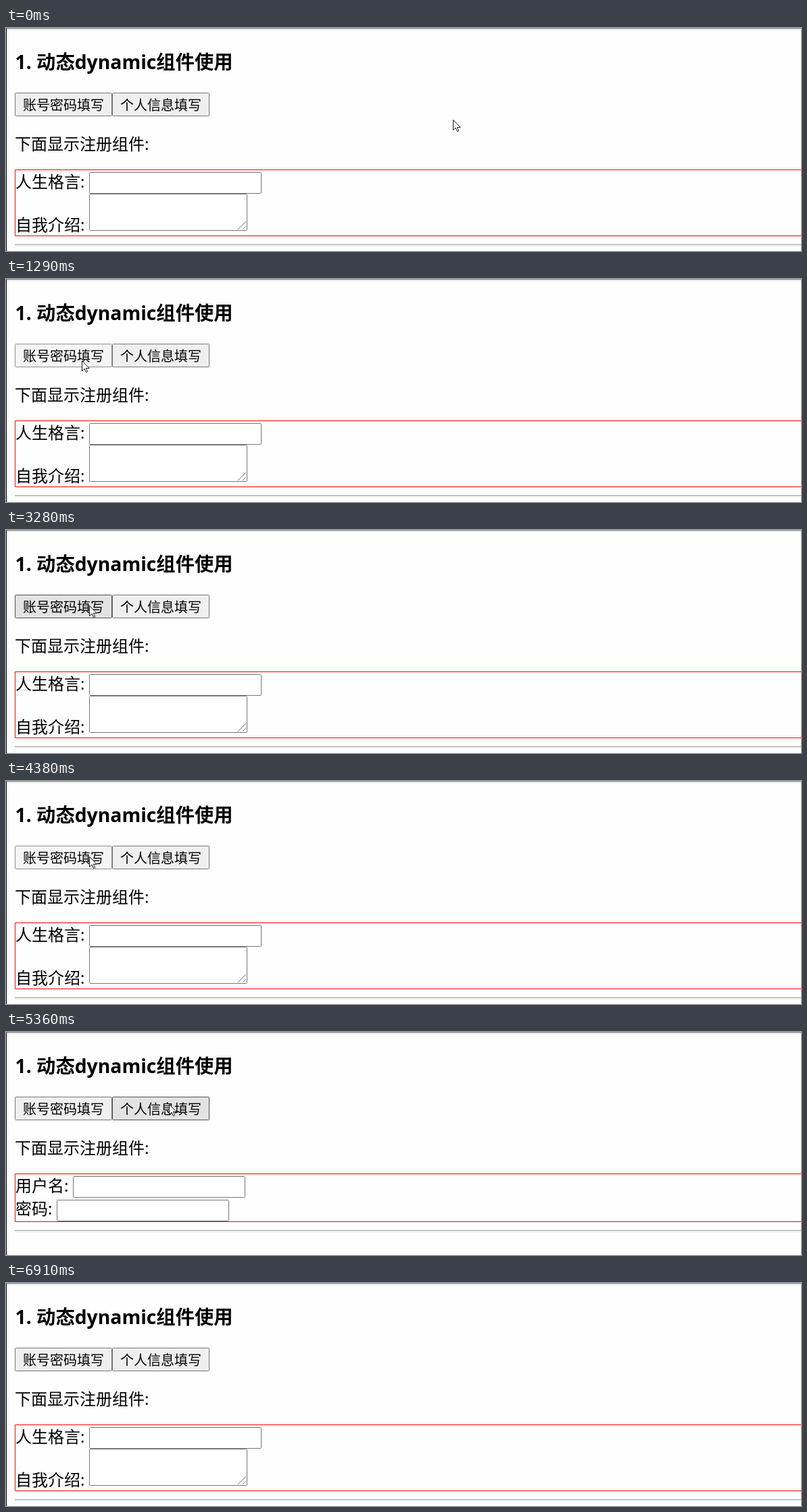
Write an HTML page that moves like this. It is 1176 px wide and 331 px high and loops after 8340 ms.

```html
<!DOCTYPE html>
<html lang="zh-CN">
<head>
<meta charset="utf-8">
<title>动态组件</title>
<style>
  html, body { margin: 0; width: 100%; height: 100%; overflow: hidden; background: #fefefe; }
  svg { display: block; width: 1176px; height: 331px; }
  text { font: 24px "Noto Sans", "Noto Sans CJK SC", "Noto Sans CJK", sans-serif; fill: #000; white-space: pre; }
  .title { font-size: 28.3px; font-weight: 700; }
  .label { font-size: 20px; }
  .field { fill: #fff; stroke: #767676; }
</style>
</head>
<body>
<svg id="stage" viewBox="0 0 1176 331"></svg>
<script>
const LOOP = 8340;
const FRAME = 140;
const LEFT = 13;
const BUTTON = { y: 96, w: 144, h: 35 };
const LABELS = ['账号密码填写', '个人信息填写'];
const LOOKS = {
  normal: ['#efefef', '#767676'],
  hover: ['#e3e3e3', '#4f4f4f'],
  active: ['#f5f5f5', '#8d8d8d']
};

// Pointer glides; bow bends the path vertically
const HOME = { x: 661, y: 136 };
const GLIDES = [
  { start: 270, end: 1010, x: 112, y: 121, bow: 25 },
  { start: 1970, end: 2240, x: 226, y: 112, bow: 0 },
  { start: 3010, end: 3280, x: 123, y: 112, bow: 0 },
  { start: 4930, end: 5360, x: 241, y: 107, bow: 0 },
  { start: 6530, end: 6790, x: 1011, y: 318, bow: -90 }
];
const POINTER_GONE = 6910;

// Each release swaps the form; the second click is too quick to be seen
const CLICKS = [[1290, 1410], [2710, 2710], [4380, 4520], [6100, 6220]];

const buttonX = i => LEFT + i * BUTTON.w;
const text = (x, y, s, cls = '') => `<text x="${x}" y="${y}" class="${cls}">${s}</text>`;
const bar = (x, y, w, h, fill) => `<rect x="${x}" y="${y}" width="${w}" height="${h}" fill="${fill}"/>`;
const outline = (x, y, w, h, cls) =>
  `<rect x="${x + .5}" y="${y + .5}" width="${w - 1}" height="${h - 1}" rx="1" class="${cls}"/>`;
const row = (label, baseline, x, y, w, h) =>
  text(LEFT + 1, baseline, label) + outline(x, y, w, h, 'field');
const rule = y => bar(LEFT, y, 1163, 1, '#9a9a9a') + bar(LEFT, y + 2, 1163, 1, '#e6e6e6');
const form = (id, bottom, rows) => `<g id="${id}">
  <path d="M1176 210.5H13.5V${bottom + .5}H1176" fill="none" stroke="#f00"/>
  ${rows}${rule(bottom + 13)}</g>`;

const stage = document.getElementById('stage');
stage.innerHTML =
  bar(0, 0, 1176, 331, '#fefefe') +
  bar(0, 0, 1176, 1, '#707070') + bar(0, 2, 1176, 1, '#dcdcdc') + bar(0, 1, 1, 330, '#000') +
  text(13.5, 61, '1. 动态dynamic组件使用', 'title') +
  LABELS.map((label, i) => outline(buttonX(i), BUTTON.y, BUTTON.w, BUTTON.h, 'button') +
    text(buttonX(i) + 12, 122, label, 'label')).join('') +
  text(LEFT, 181, '下面显示注册组件:') +
  form('info', 308,
    row('人生格言:', 237, 123, 214, 255, 32) +
    row('自我介绍:', 301, 123, 246, 234, 55) +
    '<path d="M343 299l12-12M350 299l5-5" fill="none" stroke="#777"/>') +
  form('login', 281,
    row('用户名:', 237, 99, 214, 255, 32) +
    row('密码:', 271, 75, 249, 255, 32)) +
  '<path id="pointer" d="M.5 .5V15.5L4 12.2L6.5 17.5L8.7 16.6L6.3 11.5H11.2Z" fill="#fff" stroke="#000" stroke-width=".9"/>';

const buttons = stage.querySelectorAll('.button');
const forms = ['info', 'login'].map(id => document.getElementById(id));
const pointer = document.getElementById('pointer');

function ease(u) {
  const v = 1 - (1 - u) ** 1.35;
  return v * v * (3 - 2 * v);
}

// The pointer moves in discrete steps, as in a low-rate screen recording
function pointerAt(t) {
  let from = HOME;
  for (const glide of GLIDES) {
    if (t < glide.start) break;
    const gaps = Math.round((glide.end - glide.start) / FRAME);
    const interval = (glide.end - glide.start) / gaps;
    const step = Math.min(gaps, Math.floor((t - glide.start + 20) / interval));
    const p = ease((step + 1) / (gaps + 1));
    from = {
      x: Math.round(from.x + (glide.x - from.x) * p),
      y: Math.round(from.y + (glide.y - from.y) * p + 2 * p * (1 - p) * glide.bow)
    };
  }
  return from;
}

function draw(t) {
  const { x, y } = pointerAt(t);
  const pressed = CLICKS.some(([down, up]) => t >= down && t < up);
  const swaps = CLICKS.filter(([, up]) => t >= up).length;
  pointer.setAttribute('transform', `translate(${x} ${y})`);
  pointer.setAttribute('display', t < POINTER_GONE ? 'inline' : 'none');
  forms.forEach((g, i) => g.setAttribute('display', i === swaps % 2 ? 'inline' : 'none'));
  buttons.forEach((button, i) => {
    const over = x >= buttonX(i) && x < buttonX(i + 1) &&
      y >= BUTTON.y && y < BUTTON.y + BUTTON.h;
    const [fill, stroke] = LOOKS[over ? (pressed ? 'active' : 'hover') : 'normal'];
    button.setAttribute('fill', fill);
    button.setAttribute('stroke', stroke);
  });
}

const start = performance.now();
function tick() {
  draw((performance.now() - start) % LOOP);
  requestAnimationFrame(tick);
}
tick();
</script>
</body>
</html>
```
